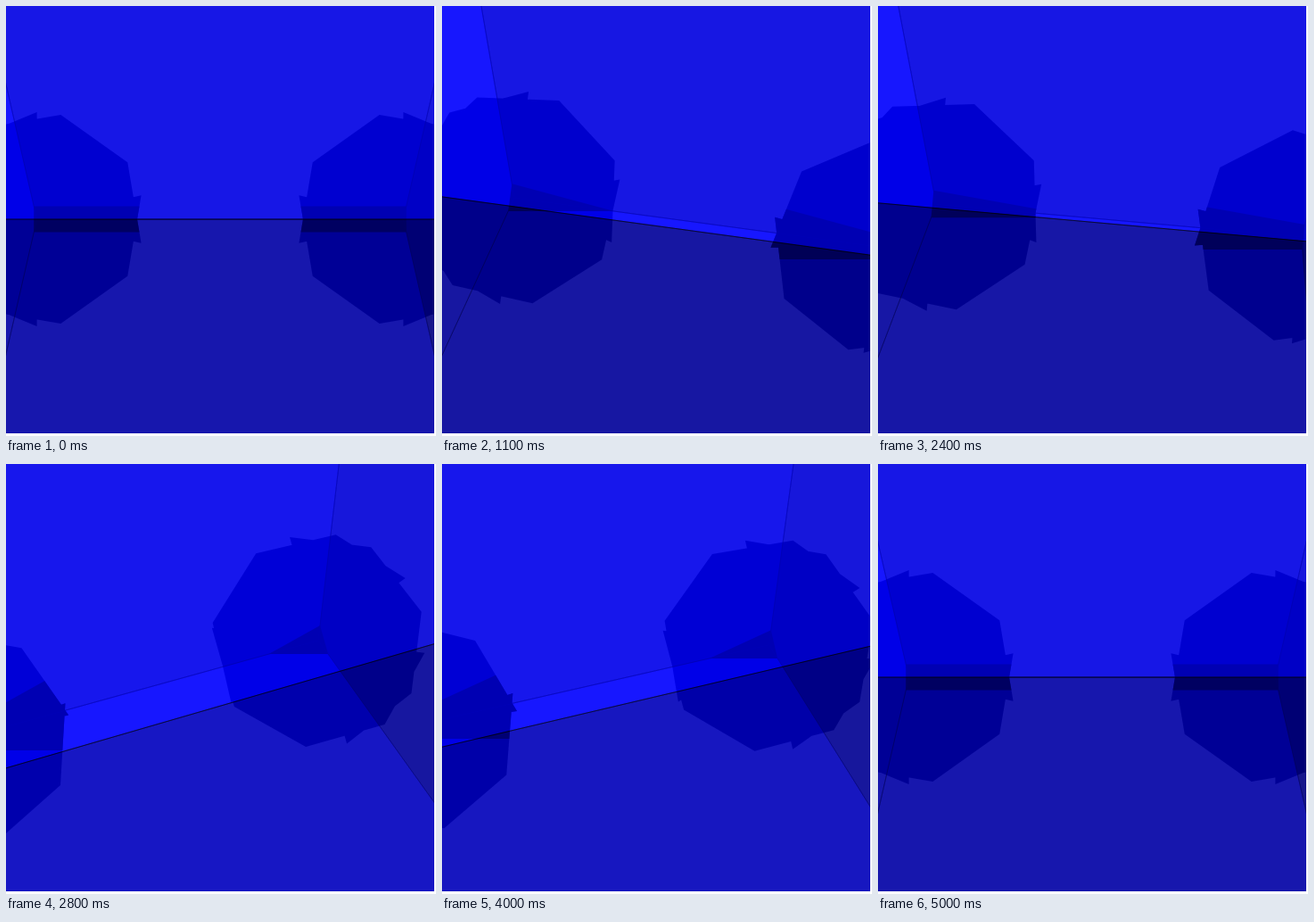
Animation, 482 px wide and 482 px high, one loop 5100 ms. Source, as an HTML page with a canvas:

```html
<!DOCTYPE html>
<html>
<head>
<meta charset="utf-8">
<style>
html, body { margin: 0; width: 100%; height: 100%; overflow: hidden; background: #fff; }
canvas { display: block; }
</style>
</head>
<body>
<canvas id="stage" width="480" height="479"></canvas>
<script>
const ctx = document.getElementById('stage').getContext('2d');
const FOCAL = 897, DISTANCE = 2.953, CAP_RADIUS = 120;
const FRAME = 100, FRAMES = 51, STEP = Math.PI / 25;
const H = Math.SQRT1_2;

// Vertices 0-3 form the floor ring, 4-7 the top ring.
const faces = [[0, 1, 2, 3], [4, 5, 6, 7]];
const neighbours = [];
for (let k = 0; k < 4; k++) {
  const next = (k + 1) % 4, prev = (k + 3) % 4;
  faces.push([k, next, next + 4, k + 4]);
  neighbours[k] = [next, prev, k + 4];
  neighbours[k + 4] = [next + 4, prev + 4, k];
}

const project = ([x, y, z]) => [240 + FOCAL * x / z, 239 - FOCAL * y / z];
const dot = (a, b) => a[0] * b[0] + a[1] * b[1] + a[2] * b[2];

function polygon(path, points) {
  points.forEach(([x, y], i) => i ? path.lineTo(x, y) : path.moveTo(x, y));
  path.closePath();
  return path;
}

// Keeps the part of a face that lies deeper than the given depth.
function deeperThan(points, depth) {
  const kept = [];
  points.forEach((p, i) => {
    const q = points[(i + 1) % points.length];
    if (p[2] >= depth) kept.push(p);
    if ((p[2] >= depth) !== (q[2] >= depth)) {
      const t = (depth - p[2]) / (q[2] - p[2]);
      kept.push(p.map((v, j) => v + t * (q[j] - v)));
    }
  });
  return kept;
}

// Three half octagons, each pointing away from one edge of the vertex.
function capPath(i, screen) {
  const path = new Path2D(), [x, y] = screen[i];
  for (const n of neighbours[i]) {
    const away = Math.atan2(y - screen[n][1], x - screen[n][0]);
    polygon(path, [-2, -1, 0, 1, 2].map(k => {
      const a = away + k * Math.PI / 4;
      return [x + CAP_RADIUS * Math.cos(a), y + CAP_RADIUS * Math.sin(a)];
    }));
  }
  return path;
}

function draw(turn) {
  const verts = [];
  for (const level of [-1, 1]) {
    for (let k = 0; k < 4; k++) {
      const a = turn + (k - 0.5) * Math.PI / 2, q = Math.SQRT2 * Math.cos(a);
      verts.push([Math.SQRT2 * Math.sin(a), (q + level) * H, (q - level) * H + DISTANCE]);
    }
  }
  const screen = verts.map(project);
  const caps = verts.map((v, i) => ({ path: capPath(i, screen), depth: v[2] - 0.00084 * v[2] ** 3 }));

  const walls = faces.map(ids => {
    const points = ids.map(i => verts[i]);
    const centre = [0, 1, 2].map(j => points.reduce((s, p) => s + p[j], 0) / 4);
    const normal = [centre[0], centre[1], centre[2] - DISTANCE];
    const far = dot(normal, centre) > 0;
    const lit = dot(normal, [83, 90, -38]) * (far ? -1 : 1);
    const blue = Math.min(255, Math.round(175 + lit));
    return { points, far, blue, path: polygon(new Path2D(), points.map(project)) };
  });

  ctx.fillStyle = '#fff';
  ctx.fillRect(0, 0, 480, 479);
  ctx.fillStyle = '#000';
  for (const cap of caps) ctx.fill(cap.path);

  for (const far of [true, false]) {
    const layer = walls.filter(w => w.far === far);
    for (const wall of layer) {
      ctx.fillStyle = `rgba(0,0,${wall.blue},0.7)`;
      ctx.fill(wall.path);
    }
    ctx.strokeStyle = 'rgba(0,0,0,0.6)';
    ctx.lineWidth = 0.8;
    for (const wall of layer) ctx.stroke(wall.path);

    ctx.fillStyle = '#000';
    for (const cap of caps) {
      ctx.save();
      ctx.clip(cap.path);
      for (const wall of layer) {
        const hidden = deeperThan(wall.points, cap.depth);
        if (hidden.length) ctx.fill(polygon(new Path2D(), hidden.map(project)));
      }
      ctx.restore();
    }
  }
}

function tick() {
  draw(-STEP * (Math.floor(performance.now() / FRAME) % FRAMES));
  requestAnimationFrame(tick);
}
tick();
</script>
</body>
</html>
```
